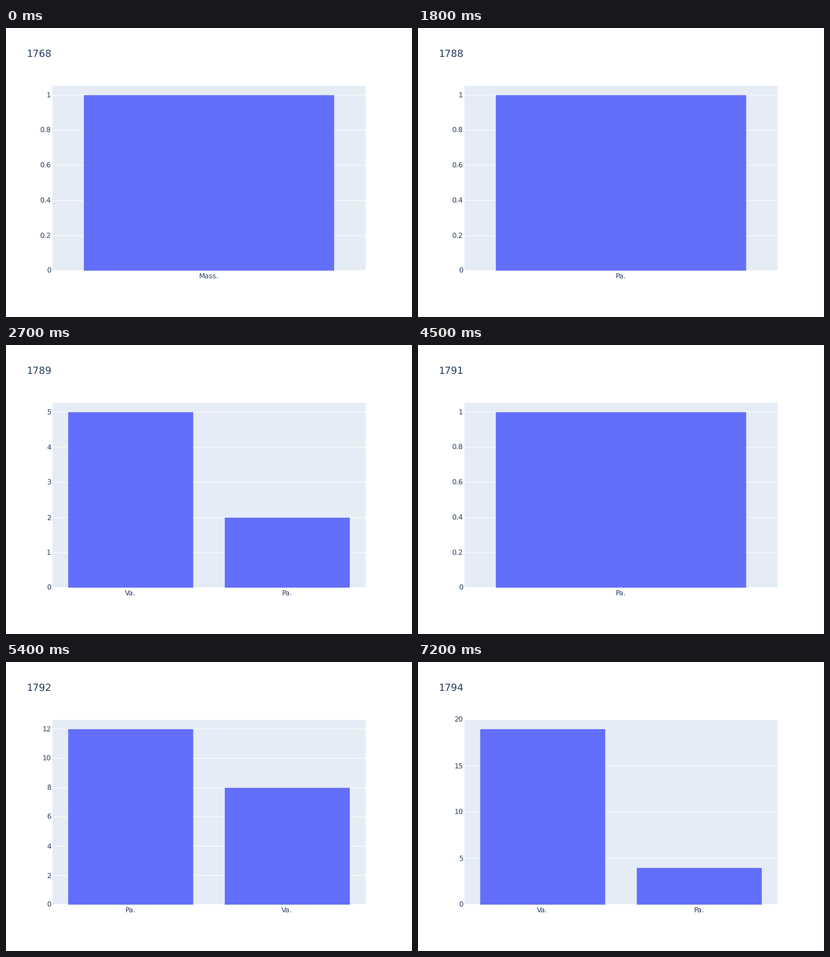
Animation, 700 px wide and 500 px high, one loop 8000 ms. Source, as a matplotlib script:

```python
import matplotlib.pyplot as plt
from matplotlib.animation import FuncAnimation
from matplotlib.patches import Rectangle

plt.rcParams["font.family"] = "DejaVu Sans"
plt.rcParams["text.hinting"] = "none"

W, H, DPI = 700, 500, 100
PT = 72 / DPI
LEFT, RIGHT, TOP, BOTTOM = 80, 620, 100, 420
INK, PANEL, BAR = "#2a3f5f", "#E5ECF6", "#636EFA"

INTERVAL = 100
HOLD = 9
FRAMES = 80

# year, bars as (label, value), spacing of the value ticks
SLIDES = [
    ("1768", [("Mass.", 1)], 0.2),
    ("1782", [], 1),
    ("1788", [("Pa.", 1)], 0.2),
    ("1789", [("Va.", 5), ("Pa.", 2)], 1),
    ("1790", [("Va.", 6)], 1),
    ("1791", [("Pa.", 1)], 0.2),
    ("1792", [("Pa.", 12), ("Va.", 8)], 2),
    ("1793", [("Va.", 14)], 2),
    ("1794", [("Va.", 19), ("Pa.", 4)], 5),
]

fig = plt.figure(figsize=(W / DPI, H / DPI), dpi=DPI, facecolor="white")
ax = fig.add_axes([0, 0, 1, 1])


def label(x, y, text, size=12, ha="center"):
    ax.text(x, y, text, size=size * PT, color=INK, ha=ha, va="baseline")


def number(value):
    return f"{value:g}".replace("-", "\u2212")


def draw_value_axis(low, high, step):
    """Draw gridlines and tick labels; return the value-to-pixel scale."""
    def to_y(value):
        return BOTTOM - (value - low) / (high - low) * (BOTTOM - TOP)

    first = round(low / step)
    last = int(high / step + 1e-6)
    for i in range(first, last + 1):
        y = to_y(i * step)
        ax.plot([LEFT, RIGHT], [y, y], color="white", lw=(1 if i else 2) * PT,
                solid_capstyle="butt", snap=False, zorder=1)
        label(77.6, y + 4.2, number(i * step), ha="right")
    return to_y


def draw_bars(bars, to_y, panel):
    slot = (RIGHT - LEFT) / len(bars)
    for i, (name, value) in enumerate(bars):
        x = LEFT + slot * (i + 0.1)
        bar = Rectangle((x, to_y(value)), slot * 0.8, BOTTOM - to_y(value),
                        facecolor=BAR, edgecolor=PANEL, lw=0.5 * PT,
                        snap=False, zorder=2)
        ax.add_patch(bar)
        bar.set_clip_path(panel)
        label(LEFT + slot * (i + 0.5) - 0.5, 433, name)


def draw(frame):
    year, bars, step = SLIDES[min(frame // HOLD, len(SLIDES) - 1)]
    ax.clear()
    ax.set(xlim=(0, W), ylim=(H, 0))
    ax.axis("off")
    panel = Rectangle((LEFT, TOP), RIGHT - LEFT, BOTTOM - TOP,
                      facecolor=PANEL, lw=0, zorder=0)
    ax.add_patch(panel)
    label(35, 50, year, size=17, ha="left")
    if bars:
        top = max(value for _, value in bars) / 0.95
        draw_bars(bars, draw_value_axis(0, top, step), panel)
    else:
        draw_value_axis(-1, 4, step)
        for i in range(-1, 7):
            label(LEFT + (i + 1) * (RIGHT - LEFT) / 7 - 0.5, 433, number(i))
    return []


anim = FuncAnimation(fig, draw, frames=FRAMES, interval=INTERVAL,
                     repeat=True, repeat_delay=0)
plt.show()
```
